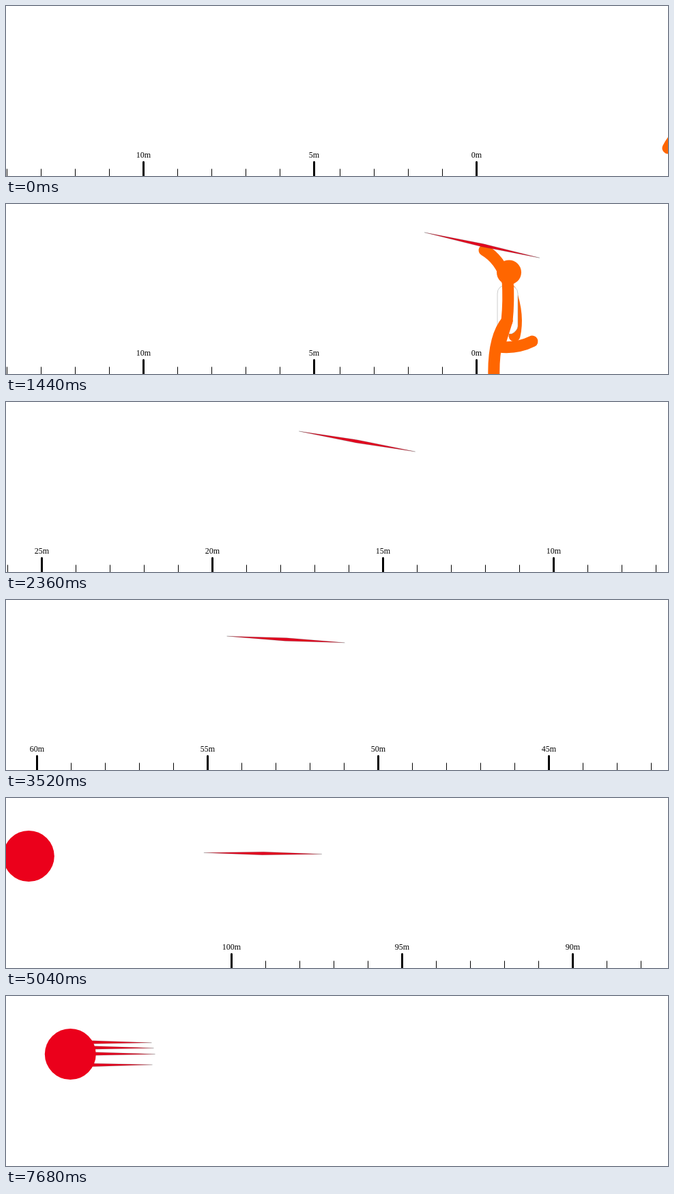
Recreate the animation shown at these times as an HTML page. Size 970x250 px, loop 8000 ms.

```html
<!DOCTYPE html>
<html lang="en">
<head>
<meta charset="utf-8">
<title>Javelin throw</title>
<style>
  html, body { margin: 0; width: 100%; height: 100%; overflow: hidden; background: #fff; }
  svg { display: block; width: 100%; height: 100%; }
  text { font: 12px "Liberation Serif", "Times New Roman", serif; text-anchor: middle; }
  .limb { fill: none; stroke: #f60; stroke-width: 17; stroke-linecap: round; stroke-linejoin: round; }
  .javelin { fill: #e2061f; stroke: #333; stroke-width: .35; stroke-opacity: .6; }
</style>
</head>
<body>
<svg id="stage" viewBox="0 0 970 250">
  <defs><clipPath id="board"><rect x="94" width="876" height="250"/></clipPath></defs>
  <g id="ruler"></g>
  <g id="runner">
    <path class="limb" id="rearArm"/>
    <path d="M-14 8V-40Q-14 -52 0 -53Q16 -52 16 -40V8Q15 15 7 19H-4Z" fill="#fff" stroke="#999" stroke-width=".5"/>
    <path class="limb" id="legB"/>
    <path class="limb" id="legA"/>
    <path class="limb" d="M1 -60Q3 -30 0 0"/>
    <path class="limb" id="throwArm"/>
    <circle cx="3" cy="-71.5" r="18" fill="#f60"/>
  </g>
  <g id="javelins" clip-path="url(#board)"></g>
  <circle id="target" cy="85.5" r="37.5" fill="#eb001b"/>
</svg>
<script>
const LOOP = 8000, STEP = 40, TRAVEL = 4690, HIP_Y = 172;
const $ = id => document.getElementById(id);

function add(parent, tag, attrs, text) {
  const el = document.createElementNS('http://www.w3.org/2000/svg', tag);
  for (const k in attrs) el.setAttribute(k, attrs[k]);
  if (text) el.textContent = text;
  parent.append(el);
  return el;
}

// Linear interpolation over rows of [time, ...values].
function keyed(rows, t) {
  if (t <= rows[0][0]) return rows[0].slice(1);
  const i = rows.findIndex(r => r[0] > t);
  if (i < 0) return rows[rows.length - 1].slice(1);
  const a = rows[i - 1], b = rows[i], k = (t - a[0]) / (b[0] - a[0]);
  return a.slice(1).map((v, j) => v + (b[j + 1] - v) * k);
}

// Each row: time, centre x, centre y, angle in degrees.
const flights = [
  [[0, 1063, 60, 14], [840, 871, 60, 14], [1440, 697.5, 60.5, 12.5], [1680, 631, 59.5, 12],
   [1960, 553, 57.5, 11.5], [2360, 514.5, 58, 10], [3360, 418, 57.3, 4], [3520, 410, 58, 3.2],
   [4360, 382.5, 72.5, 1.5], [5080, 376, 82, .6], [5280, 132, 85, .3]],
  [[6080, 1096, 47, .3], [6240, 819, 52, .3], [6640, 127, 68, .5]],
  [[6640, 1090, 50, 1], [7280, 128, 101.5, -.3]],
  [[6960, 1070, 130, 5], [7480, 397, 93, 3], [7680, 130, 76, .4]]
];

// Stride poses: knee x, y and foot x, y relative to the hip.
const stride = [
  [0, -28, 5, -45, 37], [1, -21, 25, -19, 85], [2, 8, 40, 30, 80],
  [3, -12, 38, 37, 30], [4, -28, 5, -45, 37]
];
const hipKeys = [[0, 1015], [1440, 734], [1760, 715]];
const phaseKeys = [[0, 0], [1440, 9], [1760, 10]];
const followThrough = [[1440, -33, -104], [1600, -48, -82], [1800, -46, -25]];

const ruler = $('ruler');
for (let m = 0; m <= 100; m++) {
  const x = (m < 5 ? 689 : 701) - 50 * m, major = m % 5 === 0;
  add(ruler, 'path', {
    d: major ? `M${x + .5} 229.5V251` : `M${x + .5} 239.5V250`,
    stroke: '#000', 'stroke-width': major ? 3 : 1, 'stroke-linecap': major ? 'round' : 'butt'
  });
  if (major) add(ruler, 'text', { x: x + .5, y: 223 }, m + 'm');
}
const javelins = flights.map(() =>
  add($('javelins'), 'path', { class: 'javelin', d: 'M-86.5 0L1 -2.3L86.5 0L-1 2.3Z' }));

function drawLeg(id, phase) {
  const [kx, ky, fx, fy] = keyed(stride, phase % 4);
  const d = phase % 4 > 2 ? `L${kx} ${ky}Q${kx + 27} ${ky + 3} ${fx} ${fy}` : `Q${kx} ${ky} ${fx} ${fy}`;
  $(id).setAttribute('d', 'M0 0' + d);
}

function drawRunner(t, shift) {
  const [hip] = keyed(hipKeys, t), [phase] = keyed(phaseKeys, t);
  const visible = shift < 400;
  $('runner').style.display = visible ? '' : 'none';
  if (!visible) return;
  $('runner').setAttribute('transform', `translate(${hip + shift} ${HIP_Y})`);
  drawLeg('legA', phase);
  drawLeg('legB', phase + 2);

  let [hx, hy] = keyed(followThrough, t);
  if (t <= 1440) {
    const [jx, jy] = keyed(flights[0], t);
    hx = jx + 3.5 - hip;
    hy = jy + 7.5 - HIP_Y;
  }
  $('throwArm').setAttribute('d', `M${hx} ${hy}Q${hx / 2 + 6} ${(hy - 62) / 2 - 8} 0 -60`);

  const swing = 14 * (Math.sin(phase * Math.PI / 2) - 1);
  $('rearArm').setAttribute('d', `M5 -45Q${18 + swing / 2} -8 ${11 + swing} 22`);
}

function render(time) {
  const t = Math.floor(time % LOOP / STEP) * STEP;
  const shift = Math.max(0, Math.min(TRAVEL, Math.floor(1.503 * (t - 1960))));
  ruler.setAttribute('transform', `translate(${shift} 0)`);
  ruler.setAttribute('opacity', Math.max(0, Math.min(1, 1 - (t - 5400) / 1680)));
  $('target').setAttribute('cx', 94.3 + shift - TRAVEL);
  drawRunner(t, shift);
  flights.forEach((rows, i) => {
    const [x, y, angle] = keyed(rows, t);
    javelins[i].setAttribute('transform', `translate(${x} ${y}) rotate(${angle})`);
  });
}

const start = performance.now();
function tick() {
  render(performance.now() - start);
  requestAnimationFrame(tick);
}
tick();
</script>
</body>
</html>
```
